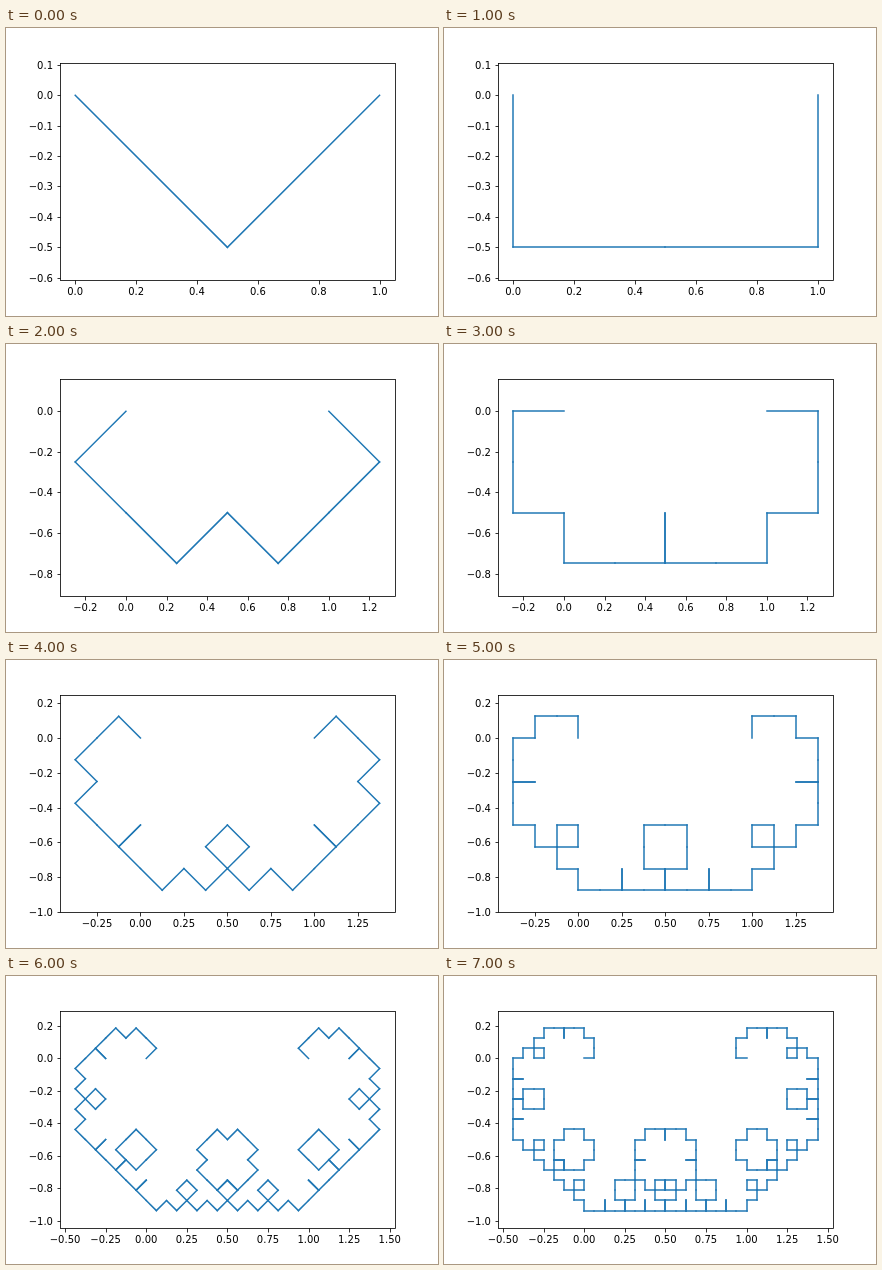
These frames come from a looping animation (432 px wide and 288 px high, 8 s). An HTML page:

```html
<!DOCTYPE html>
<html lang="en">
<head>
<meta charset="utf-8">
<title>Lévy C curve</title>
<style>
  html, body { margin: 0; width: 100%; height: 100%; overflow: hidden; background: #fff; }
  svg { display: block; width: 432px; height: 288px; }
  .curve { stroke: #1f77b4; stroke-width: 1.5; stroke-linecap: square; }
  .axis { stroke: #000; stroke-width: .8; fill: none; }
  text { font: 10px "DejaVu Sans", sans-serif; fill: #000; }
</style>
</head>
<body>
<svg id="stage" viewBox="0 0 432 288"></svg>
<script>
const STAGES = 8, HOLD = 1000;
const BOX = { left: 54, right: 388.8, top: 34.56, bottom: 252 };
// Tick steps for each pair of stages: [x step, x decimals, y step]
const TICKS = [[.2, 1, .1], [.2, 1, .2], [.25, 2, .2], [.25, 2, .2]];

const svg = document.getElementById('stage');
const snap = v => Math.floor(v + .5);

function add(parent, tag, attrs, text) {
  const el = document.createElementNS('http://www.w3.org/2000/svg', tag);
  for (const key in attrs) el.setAttribute(key, attrs[key]);
  if (text) el.textContent = text;
  return parent.appendChild(el);
}

const line = (g, x1, y1, x2, y2) => add(g, 'line', { x1, y1, x2, y2 });

// Replace every segment by the two legs of a right isosceles triangle.
function refine(points) {
  return points.flatMap(([x, y], i) => {
    if (!i) return [[x, y]];
    const [px, py] = points[i - 1], dx = x - px, dy = y - py;
    return [[px + (dx + dy) / 2, py + (dy - dx) / 2], [x, y]];
  });
}

// Equal-aspect view, fitted to the width with 5 % margins.
function fitView(points) {
  const mid = k => {
    const vals = points.map(p => p[k]), lo = Math.min(...vals), hi = Math.max(...vals);
    return { mid: (lo + hi) / 2, span: hi - lo };
  };
  const x = mid(0), y = mid(1);
  const scale = (BOX.right - BOX.left) / (1.1 * x.span);
  const cx = (BOX.left + BOX.right) / 2, cy = (BOX.top + BOX.bottom) / 2;
  return {
    x: v => cx + (v - x.mid) * scale,
    y: v => cy - (v - y.mid) * scale
  };
}

function eachTick(step, decimals, toPixel, min, max, draw) {
  for (let k = -10; k <= 10; k++) {
    const pos = toPixel(k * step);
    if (pos < min || pos > max + .01) continue;
    draw(pos, (k * step).toFixed(decimals).replace('-', '\u2212'));
  }
}

function drawAxes(g, view, [xStep, xDecimals, yStep]) {
  const axis = add(g, 'g', { class: 'axis' });
  add(axis, 'rect', { x: 54.5, y: 35.5, width: 335, height: 217 });
  eachTick(xStep, xDecimals, view.x, BOX.left, BOX.right, (x, label) => {
    const px = snap(x) + .5;
    line(axis, px, 252.5, px, 256.5);
    add(g, 'text', { x, y: 267, 'text-anchor': 'middle' }, label);
  });
  eachTick(yStep, 1, view.y, BOX.top, BOX.bottom, (y, label) => {
    const py = snap(y) + .5;
    line(axis, 51.5, py, 54.5, py);
    add(g, 'text', { x: 47, y: snap(y + 4), 'text-anchor': 'end' }, label);
  });
}

function drawCurve(g, view, points, align) {
  const curve = add(g, 'g', { class: 'curve' });
  const px = points.map(([x, y]) => [view.x(x), view.y(y)].map(align));
  for (let i = 1; i < px.length; i++) line(curve, ...px[i - 1], ...px[i]);
}

let points = [[0, 0], [1, 0]];
for (let i = 0; i < STAGES; i++) {
  points = refine(points);
  const g = add(svg, 'g', {}), view = fitView(points);
  // Odd stages hold only horizontal and vertical segments, kept on the pixel grid.
  drawCurve(g, view, points, i % 2 ? snap : v => v);
  drawAxes(g, view, TICKS[i >> 1]);
  g.animate([
    { opacity: 1, offset: 0 },
    { opacity: 1, offset: 1 / STAGES },
    { opacity: 0, offset: 1 / STAGES },
    { opacity: 0, offset: 1 }
  ], { duration: STAGES * HOLD, delay: (i - STAGES) * HOLD, iterations: Infinity });
}
</script>
</body>
</html>
```
